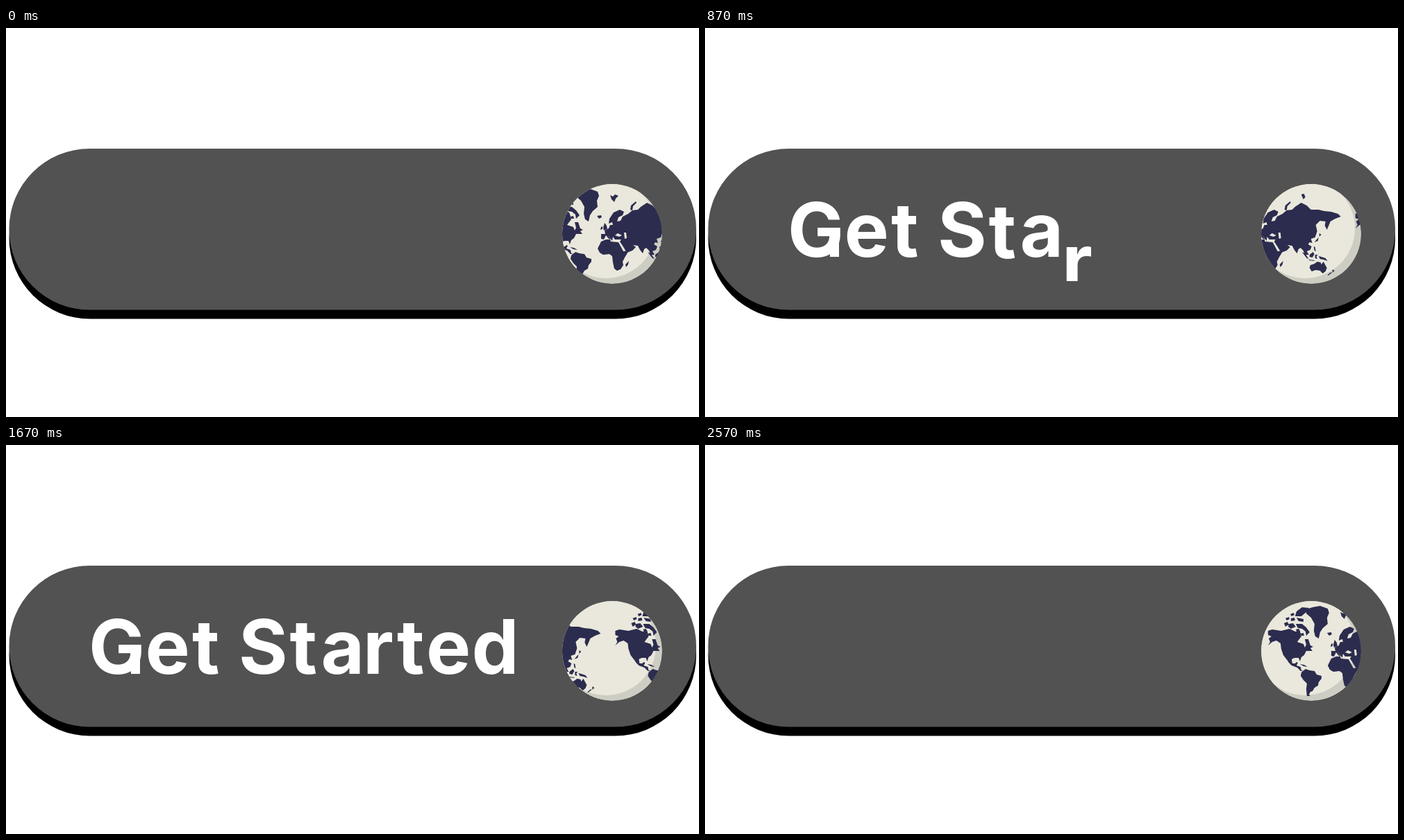
Write an HTML page that moves like this. It is 998 by 561 pixels and loops after 2.61 s.

```html
<!DOCTYPE html>
<html lang="en">
<head>
<meta charset="utf-8">
<title>Get Started</title>
<style>
  html, body { margin: 0; width: 100%; height: 100%; overflow: hidden; background: #fff; }
  svg { display: block; width: 998px; height: 561px; }
  text { font: 700 108px Inter, sans-serif; }
</style>
</head>
<body>
<svg viewBox="0 0 998 561" xmlns="http://www.w3.org/2000/svg">
  <defs>
    <clipPath id="band"><rect x="100" y="214" width="680" height="151"/></clipPath>
    <clipPath id="disc"><circle cx="873" cy="297" r="72"/></clipPath>
    <g id="map">
      <g id="americas" transform="translate(-45)">
        <path d="M811 268L817 266 830 268 842 265 850 269 857 268 859 276 853 284 862 287 864 292 866 288 864 280 869 280 872 289 876 291 872 293 875 297 866 297 863 303 859 306 857 312 855 307 849 307 845 309 846 315 850 315 852 313 854 314 852 318 858 320 859 325 863 326 858 326 853 321 845 318 841 314 836 306 839 311 833 303 830 294 829 286 823 282 817 284 811 289 814 284 812 279 816 276 811 274Z"/>
        <path d="M852 240L860 234 870 235 866 241 859 247 850 247ZM851 258L860 258 866 263 871 270 866 275 865 269 860 265 854 264ZM841 258l6-1 4 5-7 3-4-3ZM834 257l5-2 2 4-5 3ZM836 250l5-2 1 3-4 2ZM844 250l5-1 1 4-6 1ZM843 244l5-2 1 3-4 2ZM852 249l5 1 5 1 0 4-7-1ZM851 266l4-1 2 3-4 2ZM858 272l4-1 1 4-4 0Z"/>
        <path d="M866 237L875 234 886 232 897 236 899 242 896 249 897 258 890 264 886 270 884 279 879 276 877 268 878 258 873 249 866 243Z"/>
        <path d="M896 271L902 270 903 273 899 275ZM857 316L863 317 868 320 862 319Z"/>
        <path d="M859 328L865 323 871 325 878 326 881 331 888 333 888 337 884 342 883 347 878 350 875 355 872 356 870 360 872 362 867 362 866 352 867 344 862 339 858 333Z"/>
      </g>
      <g id="eurasia">
        <path d="M857 304L857 297 863 297 862 292 868 289 870 284 874 284 873 280 868 282 869 275 875 266 884 262 890 265 888 270 882 273 880 279 885 278 888 272 896 268 902 263 910 262 914 258 923 252 931 256 937 262 948 262 956 264 966 265 976 268 980 272 972 275 965 279 963 284 960 291 957 285 958 279 950 278 944 284 946 293 943 302 937 304 939 310 935 309 933 312 938 315 936 320 931 322 934 327 930 327 932 332 929 329 926 321 922 317 919 319 917 325 913 320 910 314 903 313 907 316 902 321 894 324 888 314 884 308 886 305 877 305 874 301 873 307 870 303 866 298 871 305 868 304 864 299 861 305Z"/>
        <path fill="#eae8dc" d="M877 299l4-3 6 3-4 2ZM890 295l3 0 1 8-3 1Z"/>
      </g>
      <g id="africa">
        <path d="M852 318L857 308 864 305 870 305 871 308 882 309 889 322 897 321 891 331 888 337 889 342 885 348 880 350 876 347 874 338 873 329 869 326 860 327 855 324ZM897 336l-1 5-3 4-1-4Z"/>
      </g>
      <g id="islands">
        <path d="M860 288l2-7 3 4 1 5-5 2ZM857 287l2-1v4l-3 1ZM870 241l4 2 3-3 5 2-4 4-2 5-4-4ZM899 262L900 256 907 250 908 252 903 257 902 263ZM923 240l4-1 2 5-3 3ZM949 296l3 2-3 3ZM948 302l-1 5-5 2 4-5Z"/>
        <path d="M924 323l4 2 6 8-3-1ZM934 334l8 1v1l-8-1ZM935 327l5-4 2 3-3 5-4-1ZM941 315l2 1 1 6-2-1ZM943 327l4 0-2 2 1 4-3-1ZM948 329l4 1 6 2 3 4-6-2-5-1Z"/>
        <path d="M935 346L936 342 942 340 946 337 951 338 952 341 955 337 960 346 958 351 954 354 950 350 944 349 938 351ZM968 348l3 2-3 3ZM966 352l-5 4 1 1 5-4Z"/>
      </g>
    </g>
  </defs>

  <rect x="4.5" y="186" width="989.5" height="233.5" rx="116.5"/>
  <rect x="4.5" y="174" width="989.5" height="232.5" rx="116"  fill="#525252"/>

  <g clip-path="url(#band)" fill="#fff" id="word"></g>

  <g clip-path="url(#disc)">
    <circle cx="873" cy="297" r="72" fill="#cdcdc3"/>
    <circle cx="864" cy="289" r="72" fill="#eae8dc"/>
    <g id="land" fill="#2c2c4f">
      <use href="#map"/>
      <use href="#map" x="235"/>
    </g>
  </g>
</svg>
<script>
const LOOP = 2610, STEP = 100 / 3, BASE = 330;
const NS = "http://www.w3.org/2000/svg";
const land = document.getElementById("land");
const word = document.getElementById("word");

// character, ink centre, time it lands, side it comes from (-1 above, 1 below)
const letters = [
  ["G", 159, 503, -1], ["e", 233, 585, -1], ["t", 287.5, 566, 1],
  ["S", 370.5, 780, -1], ["t", 428, 900, 1], ["a", 483, 788, -1],
  ["r", 538.5, 1010, 1], ["t", 582.5, 1136, -1], ["e", 637.5, 1235, -1],
  ["d", 703.5, 1330, -1]
];

const pen = document.createElement("canvas").getContext("2d");
pen.font = "700 108px Inter, sans-serif";

function add(parent, tag, attrs) {
  const el = document.createElementNS(NS, tag);
  for (const k in attrs) el.setAttribute(k, attrs[k]);
  return parent.appendChild(el);
}

const glyphs = letters.map(([ch, mid, land, side], i) => {
  const m = pen.measureText(ch);
  const x = mid - (m.actualBoundingBoxRight - m.actualBoundingBoxLeft) / 2;
  const el = add(word, "g", {});
  add(el, "text", { x, y: BASE }).textContent = ch;
  if (ch === "G") add(el, "rect", { x: 180, y: 289, width: 13, height: 41 });
  return { el, land, side, leave: 1650 + 50 * i };
});

function offset(g, t) {
  const rise = 0.048 * Math.max(0, g.land - t);
  const fall = 0.021 * Math.max(0, t - g.leave);
  return g.side * rise ** 2 + fall ** 3;
}

function draw(now) {
  const t = now % LOOP;
  const s = t < 70 ? 0 : 70 + Math.floor((t - 69.5) / STEP) * STEP;
  for (const g of glyphs) {
    g.el.setAttribute("transform", `translate(0 ${offset(g, s).toFixed(2)})`);
  }
  land.setAttribute("transform", `translate(${(-0.074 * s).toFixed(2)} 0)`);
}

const start = performance.now();
function tick() {
  draw(performance.now() - start);
  requestAnimationFrame(tick);
}
tick();
</script>
</body>
</html>
```
